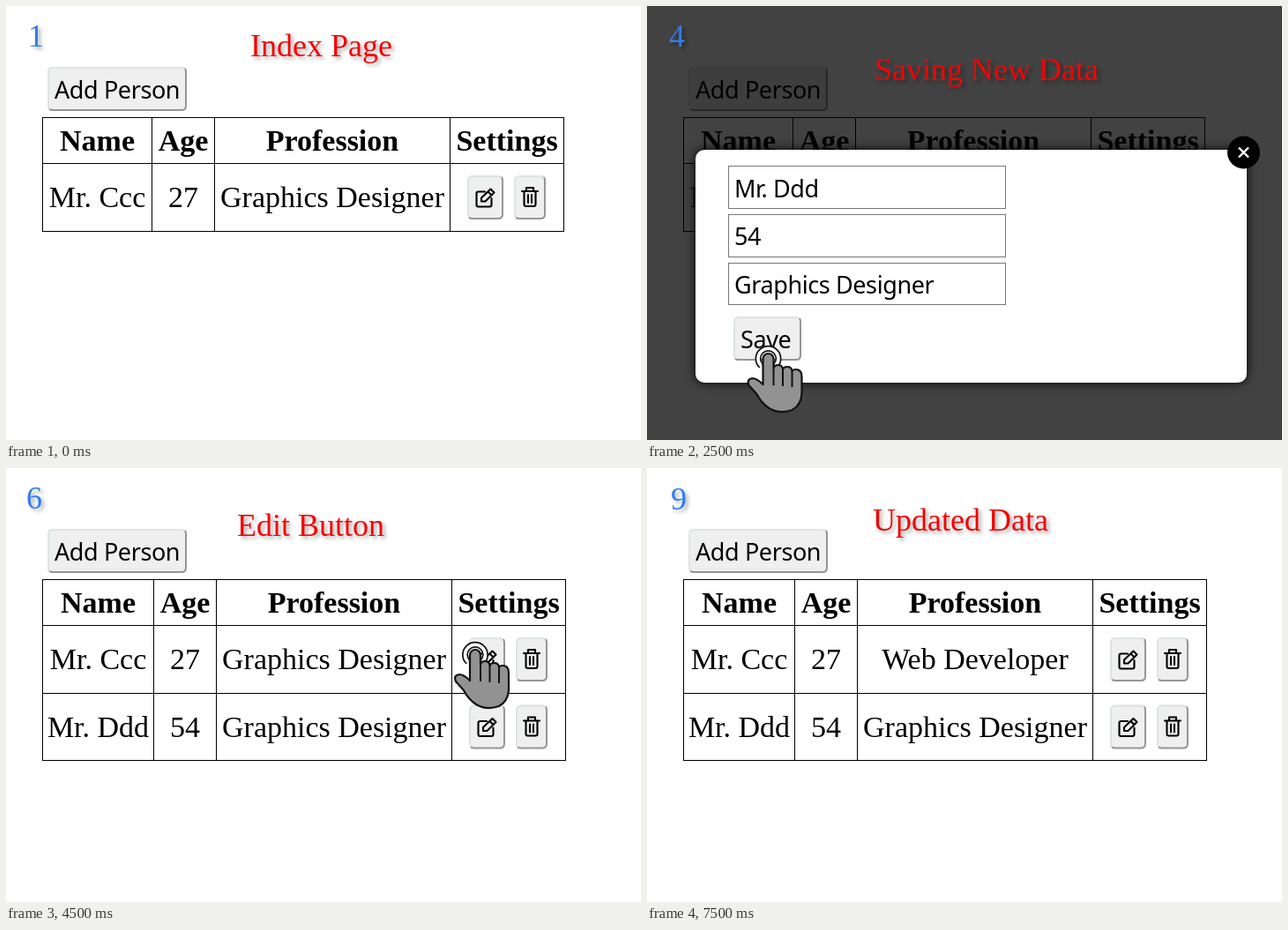
Animation of 720 by 492 pixels, one loop 8000 ms. Source, as an HTML page:

```html
<!DOCTYPE html>
<html lang="en">
<head>
<meta charset="utf-8">
<title>Person table demo</title>
<style>
  html, body { margin: 0; width: 100%; height: 100%; overflow: hidden; background: #fff; }
  svg { position: absolute; left: 0; top: 0; display: block; }
  text { white-space: pre; }
  .cell { font: 34px "Liberation Serif", "Times New Roman", serif; text-anchor: middle; }
  .head { font-weight: bold; }
  .ui { font: 27px "Noto Sans", "Open Sans", sans-serif; letter-spacing: -.4px; }
  .hint { fill: #757575; }
  .note { font: 36px "Liberation Serif", "Times New Roman", serif; text-shadow: 3px 3px 4px rgba(0, 0, 0, .33); }
  .title { fill: #f00505; }
  .num { fill: #2f7cf3; }
  .grid { stroke: #000; fill: none; shape-rendering: crispEdges; }
  .icon { fill: none; stroke: #000; stroke-width: 2.1; stroke-linejoin: round; stroke-linecap: round; }
  .field { fill: #fff; stroke: #767676; }
  .modal { fill: #fff; filter: drop-shadow(0 0 6px #000); }
  .scene + .scene { opacity: 0; }
</style>
</head>
<body>
<svg id="stage" width="720" height="492" viewBox="0 0 720 492"></svg>
<script>
const LOOP = 8000;
const COLS = ['Name', 'Age', 'Profession', 'Settings'];
const FIRST = ['Mr. Ccc', '27', 'Graphics Designer'];
const SECOND = ['Mr. Ddd', '54', 'Graphics Designer'];
const EDITED = ['Mr. Ccc', '27', 'Web Developer'];

const text = (x, y, str, cls) => `<text x="${x}" y="${y}" class="${cls}">${str}</text>`;
const at = (x, y, body) => `<g transform="translate(${x} ${y})">${body}</g>`;

// Raised button: pale top-left edge, grey bottom-right edge
const button = (x, y, w, h, body = '') => at(x, y, `
  <rect width="${w}" height="${h}" rx="6" fill="#efefef"/>
  <g fill="none" stroke-width="2">
    <path d="M2 ${h - 2}Q1 ${h - 4} 1 ${h - 6}V6Q1 1 6 1H${w - 6}Q${w - 4} 1 ${w - 2} 2" stroke="#dde5e4"/>
    <path d="M${w - 2} 2Q${w - 1} 4 ${w - 1} 6V${h - 6}Q${w - 1} ${h - 1} ${w - 6} ${h - 1}H6Q4 ${h - 1} 2 ${h - 2}" stroke="#969696"/>
  </g>${body}`);

const PEN = `<path class="icon" d="M20 18.5H12.5Q10.500 18.500 10.500 20.500V33.500Q10.500 35.500 12.500 35.500H25.500Q27.500 35.500 27.500 33.500V26
  M16 29.500V25.500L26.500 15.500L30.500 19.500L20.500 29.500ZM23.500 18.500L27.500 22.500"/>`;
const BIN = `<path class="icon" d="M9 18H27M14 18V14H22V18M11.500 18V33Q11.500 35 13.500 35H22.500Q24.500 35 24.500 33V18M16 22V31M20 22V31"/>`;

function page(rows) {
  const grow = rows.length > 1 ? 2 : 0;
  const xs = [41, 165 + grow, 236 + grow, 503 + grow, 632 + grow];
  const ys = [126, 178, 255, 331].slice(0, rows.length + 2);
  const bottom = ys[ys.length - 1];
  const mid = i => (xs[i] + xs[i + 1] + 1) / 2;
  const lines = xs.map(x => `M${x + .5} 126V${bottom + 1}`).join('') +
    ys.map(y => `M41 ${y + .5}H${xs[4] + 1}`).join('');
  return '<rect width="720" height="492" fill="#fff"/>' +
    button(47, 69, 158, 50) + text(55, 105, 'Add Person', 'ui') +
    `<path class="grid" d="${lines}"/>` +
    COLS.map((s, i) => text(mid(i), 164, s, 'cell head')).join('') +
    rows.map((row, r) => {
      const y = 192 + r * 76.5;
      return row.map((s, i) => text(mid(i), 228 + r * 77, s, 'cell')).join('') +
        button(523 + grow, y, 41, 50, PEN) + button(576 + grow, y, 36, 50, BIN);
    }).join('');
}

function form(top, height, firstField, values, label, hint) {
  const saveY = Math.round(firstField + 170.5);
  return '<rect width="720" height="492" fill="#000" opacity=".74"/>' +
    `<rect class="modal" x="55" y="${top}" width="625" height="${height}" rx="10"/>` +
    values.map((s, i) => {
      // Edges snap to whole pixels, as a browser does with form fields
      const y = firstField + i * 54.7;
      const y0 = Math.round(y), y1 = Math.round(y + 47.4);
      return `<rect class="field" x="92.5" y="${y0 + .5}" width="314" height="${y1 - y0}"/>` +
        text(99, Math.round(y + 35.2), s, hint ? 'ui hint' : 'ui');
    }).join('') +
    button(98, saveY, label === 'Save' ? 77 : 106, 50) + text(106, saveY + 36, label, 'ui') +
    at(676.5, top + 3, `<circle r="18.500"/>
      <path d="M-5.500 -5.500L5.500 5.500M5.500 -5.500L-5.500 5.500" stroke="#fff" stroke-width="2.400"/>`);
}

const addForm = (values, hint) => form(163, 264, 181.4, values, 'Save', hint);
const editForm = values => form(143, 304, 200.9, values, 'Update');

// Pressing hand; (x, y) is the fingertip ring centre
const RING = 'M-8 8A11.500 11.500 0 1 1 8 8';
const hand = (x, y) => at(x, y, `
  <path d="${RING}" fill="none" stroke="#111" stroke-width="7"/>
  <path d="${RING}" fill="none" stroke="#fff" stroke-width="3.600"/>
  <path d="M-6 0a6 6 0 0 1 12 0V11q1-4 5-4 5 0 5.500 5 1-3 5-3 5 0 5.500 5 1-2 4-2 7 0 7 8V38
    Q38 52 27 58Q13 63 1 56Q-8 50 -13 40L-22 30Q-25 23 -18 22Q-13 22 -6 29Z"
    fill="#929292" stroke="#111" stroke-width="2.200" stroke-linejoin="round"/>
  <path d="M6 11V30M16.500 12V31M27 14V32" stroke="#111" stroke-width="2"/>`);

const IBEAM = '<path d="M334 315.500Q341 315 341 319Q341 315 348 315.500M341 318V351M334 353.500Q341 354 341 350Q341 354 348 353.500" fill="none" stroke="#000" stroke-width="2"/>';

const one = page([FIRST]);
const two = page([FIRST, SECOND]);
const done = page([EDITED, SECOND]);

// start, number x, number y, title x, title y, title, picture
const STEPS = [
  [0, 25, 46, 277, 57, 'Index Page', one],
  [500, 25, 43, 268, 57, 'Add Button', one + hand(126, 90)],
  [1500, 26, 34, 277, 90, 'Add Form', one + addForm(['name', 'age', 'profession'], true)],
  [2500, 25, 46, 258, 84, 'Saving New Data', one + addForm(SECOND) + hand(137.5, 400)],
  [3500, 23, 47, 242, 77, 'New Data Added', two],
  [4500, 23, 46, 262, 77, 'Edit Button', two + hand(532, 212)],
  [5500, 48, 42, 270, 87, 'Edit Form', two + editForm(FIRST) + IBEAM],
  [6500, 45, 41, 228, 87, 'Saving Edited Data', two + editForm(EDITED) + hand(150, 396)],
  [7500, 27, 47, 256, 71, 'Updated Data', done]
];

const stage = document.getElementById('stage');
stage.innerHTML = STEPS.map(([, nx, ny, tx, ty, title, picture], i) =>
  `<g class="scene">${picture}${text(nx, ny, i + 1, 'note num')}${text(tx, ty, title, 'note title')}</g>`
).join('');

// The first scene stays on; each later one covers it during its own time
const key = (opacity, offset) => ({ opacity, offset, easing: 'steps(1, end)' });
stage.querySelectorAll('.scene + .scene').forEach((el, i) => {
  const start = STEPS[i + 1][0] / LOOP;
  const end = i + 2 < STEPS.length ? STEPS[i + 2][0] / LOOP : 1;
  el.animate([key(0, 0), key(1, start), key(0, end), key(0, 1)],
    { duration: LOOP, iterations: Infinity });
});
</script>
</body>
</html>
```
